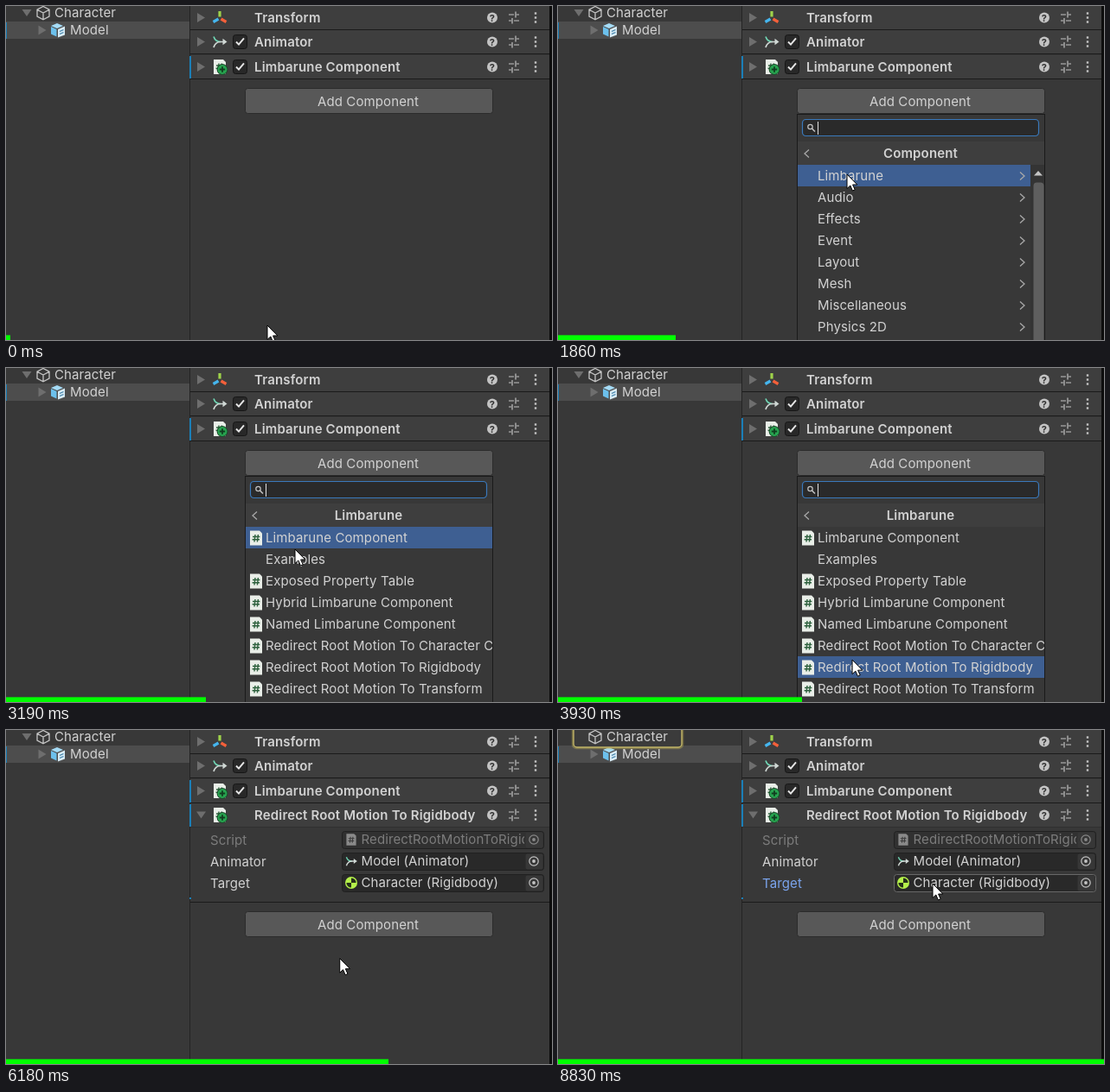
These frames come from a looping animation (631 px wide and 387 px high, 8.9 s). An HTML page with a canvas:

```html
<!DOCTYPE html>
<html lang="en">
<head>
<meta charset="utf-8">
<title>Adding a component</title>
<style>
  html, body { margin: 0; width: 100%; height: 100%; overflow: hidden; background: #383838; }
  canvas { display: block; }
</style>
</head>
<body>
<canvas id="stage" width="631" height="387"></canvas>
<script>
const W = 631, H = 387, LOOP = 8900, STEPS = 134, STEP = LOOP / STEPS;
const ctx = document.getElementById('stage').getContext('2d');
const TEXT = '#d2d2d2', PANEL = '#383838', HEADER = '#3e3e3e', LINE = '#1a1a1a', SELECT = '#3e5f92', BLUE = '#1b7fb8';
const PLUGIN = 'Limbarune';

const CATEGORIES = [PLUGIN, 'Audio', 'Effects', 'Event', 'Layout', 'Mesh', 'Miscellaneous', 'Physics 2D'];
const SCRIPTS = [`${PLUGIN} Component`, 'Examples', 'Exposed Property Table', `Hybrid ${PLUGIN} Component`,
  `Named ${PLUGIN} Component`, 'Redirect Root Motion To Character Controller',
  'Redirect Root Motion To Rigidbody', 'Redirect Root Motion To Transform'];

// Times in ms
const MENU_OPEN = 1150, SLIDE = 2080, SLIDE_TIME = 250, ADDED = 4715, PING = 7084, PING_TIME = 200;
const CLICKS = [[990, 1150], [1945, 2080], [4500, 4715], [7050, 7300]];
const PATH = [ // time, x, y
  [150, 302, 370], [830, 325, 108], [1150, 325, 110], [1700, 334, 195], [3060, 334, 196],
  [3190, 334, 210], [3730, 340, 328], [3860, 340, 338], [4400, 341, 343], [4700, 342, 345],
  [5680, 342, 345], [6700, 433, 178]];

const smooth = u => u * u * (3 - 2 * u);
const clamp01 = u => Math.min(1, Math.max(0, u));

function cursorAt(time) {
  const next = PATH.findIndex(p => p[0] > time);
  if (next === 0) return PATH[0].slice(1);
  if (next < 0) return PATH[PATH.length - 1].slice(1);
  const [t0, x0, y0] = PATH[next - 1], [t1, x1, y1] = PATH[next];
  const u = smooth((time - t0) / (t1 - t0));
  return [x0 + (x1 - x0) * u, y0 + (y1 - y0) * u];
}

function rect(x, y, w, h, color) {
  ctx.fillStyle = color;
  ctx.fillRect(x, y, w, h);
}

function box(x, y, w, h, r, fill, stroke, lineWidth = 1) {
  ctx.beginPath();
  ctx.roundRect(x + .5, y + .5, w - 1, h - 1, r);
  ctx.fillStyle = fill;
  ctx.fill();
  if (stroke) {
    ctx.strokeStyle = stroke;
    ctx.lineWidth = lineWidth;
    ctx.stroke();
  }
}

function disc(x, y, r, color) {
  ctx.beginPath();
  ctx.arc(x, y, r, 0, Math.PI * 2);
  ctx.fillStyle = color;
  ctx.fill();
}

function ring(x, y, r, color) {
  ctx.beginPath();
  ctx.arc(x, y, r, 0, Math.PI * 2);
  ctx.strokeStyle = color;
  ctx.lineWidth = 1.2;
  ctx.stroke();
}

function line(d, color, width = 1.5, x = 0, y = 0) {
  ctx.save();
  ctx.translate(x, y);
  ctx.strokeStyle = color;
  ctx.lineWidth = width;
  ctx.stroke(new Path2D(d));
  ctx.restore();
}

function shape(d, color, x = 0, y = 0) {
  ctx.save();
  ctx.translate(x, y);
  ctx.fillStyle = color;
  ctx.fill(new Path2D(d));
  ctx.restore();
}

function label(text, x, y, color = TEXT, weight = 400, align = 'left', size = 15) {
  ctx.font = `${weight} ${size}px Inter, sans-serif`;
  ctx.letterSpacing = weight === 400 ? '0.11px' : '0.16px';
  ctx.textAlign = align;
  ctx.fillStyle = color;
  ctx.fillText(text, x, y);
}

function clipped(x, y, w, h, draw) {
  ctx.save();
  ctx.beginPath();
  ctx.rect(x, y, w, h);
  ctx.clip();
  draw();
  ctx.restore();
}

function scaled(x, y, scale, draw) {
  ctx.save();
  ctx.translate(x, y);
  ctx.scale(scale, scale);
  draw();
  ctx.restore();
}

// Icons, placed by their centre
const arrowRight = (x, y) => shape('M-4.5-5.5 4.5 0-4.5 5.5Z', '#6e6e6e', x, y);
const arrowDown = (x, y) => shape('M-5.5-4H5.5L0 4Z', '#6e6e6e', x, y);
const chevron = (x, y, dir) => line(`M${-2.5 * dir}-4.5 ${2.5 * dir} 0 ${-2.5 * dir} 4.5`, '#a8a8a8', 1.3, x, y);

function cubeOutline(x, y) {
  line('M0-7.5 7-3.8V4L0 7.7-7 4V-3.8ZM-7-3.8 0 0 7-3.8M0 0V7.7', '#c6c6c6', 1.3, x, y);
}

function prefabCube(x, y) {
  shape('M-1-8 6-5-1-2-8-5Z', '#a5dcf7', x, y);
  shape('M-8-4-1.5-1V7.5L-8 4.5Z', '#6cc0ec', x, y);
  shape('M0-1 8-4.5V5.5L0 8.5Z', '#d8ecf6', x, y);
  line('M2 1.5 6.5-.5M2 4.5 6.5 2.5', '#3b7fa8', 1.3, x, y);
}

function scriptIcon(x, y, paper = '#e9eee8', ink = '#2b5f3b') {
  shape('M-7-8.5H4L7-5.5V8.5H-7Z', paper, x, y);
  line('M-1-4-2 4.5M2.4-4 1.4 4.5M-4-1.5H4.4M-4.4 1.8H4', ink, 1.4, x, y);
}

function addedScriptIcon(x, y) {
  scriptIcon(x, y);
  disc(x + 3, y + 3, 6.4, '#1d4a2c');
  disc(x + 3, y + 3, 5.4, '#27a34f');
  line('M-3.2 0H3.2M0-3.2V3.2', '#123d20', 1.8, x + 3, y + 3);
}

function transformIcon(x, y) {
  line('M0-1V-7.5', '#9fd34a', 3.2, x, y);
  line('M-1.5 1.5-7.5 5', '#45b5ee', 3.2, x, y);
  line('M1.5 1.5 7.5 5', '#f4603a', 3.2, x, y);
}

function animatorIcon(x, y) {
  line('M-7-6Q-5 0 1 0', '#6fd6b4', 1.7, x, y);
  line('M-7 6.5Q-5 0 1 0H6', '#d0d8d5', 1.7, x, y);
  shape('M3.5-3.8 8.5 0 3.5 3.8Z', '#d0d8d5', x, y);
}

function rigidbodyIcon(x, y) {
  disc(x, y, 7, '#b4f04a');
  shape('M0 0V-5.6A5.6 5.6 0 0 1 5.6 0ZM0 0V5.6A5.6 5.6 0 0 1-5.6 0Z', '#26301a', x, y);
}

function checkbox(x, y) {
  box(x - 8, y - 8, 17, 17, 3, '#282828', '#161616');
  line('M-4 .5-1 3.6 5-3.6', '#e6e6e6', 2, x, y);
}

function hierarchy() {
  rect(0, 18, 212, 20, '#4d4d4d');
  rect(0, 19, 1, 19, BLUE);
  arrowDown(24, 8);
  cubeOutline(43, 8);
  label('Character', 56, 13);
  arrowRight(42, 28);
  prefabCube(60, 28);
  label('Model', 74, 33);
}

function componentHeader(name, y, icon, { enabled, added, open } = {}) {
  const bottom = Math.floor(y + 13.5);
  rect(213, bottom - 27, 415, 27, HEADER);
  rect(213, bottom, 415, 1, open ? '#303030' : LINE);
  if (added) rect(212, bottom - 26, 2, 26, BLUE);
  (open ? arrowDown : arrowRight)(225.5, y);
  icon(247, y);
  if (enabled) checkbox(270, Math.floor(y));
  label(name, 287, Math.floor(y + 5.5), TEXT, 600);
  disc(562, y, 6, '#c4c4c4');
  label('?', 562, y + 4, '#333', 700, 'center', 11);
  line('M-6-3.5H0M3-3.5H6M2-7V0M-6 3.5H-3M0 3.5H6M-2 .5V7', '#c4c4c4', 1.2, 587, y);
  for (const dy of [-5, 0, 5]) rect(610.8, y + dy - 1.2, 2.4, 2.4, '#c4c4c4');
}

function objectField(name, value, y, icon, { disabled, focused } = {}) {
  const color = disabled ? '#7c7c7c' : TEXT, dot = disabled ? '#8a8a8a' : '#c4c4c4';
  label(name, 236, y + 6, focused ? '#7ba5ee' : color);
  box(388, y - 10, 234, 21, 3, disabled ? '#313131' : '#292929', focused ? '#686868' : '#202020');
  box(600, y - 9, 21, 19, 2, '#373737');
  icon(399, y);
  clipped(408, y - 10, 191, 21, () => label(value, 410.5, y + 5, color));
  ring(610, y, 5.2, dot);
  disc(610, y, 1.9, dot);
}

function addButton(y, hover) {
  box(276, y, 287, 30, 3, hover ? '#676767' : '#585858', '#2b2b2b');
  label('Add Component', 418.5, y + 21, TEXT, 400, 'center');
}

function inspector(time, [x, y]) {
  const added = time >= ADDED;
  componentHeader('Transform', 13.5, transformIcon);
  componentHeader('Animator', 41.5, animatorIcon, { enabled: true });
  componentHeader(`${PLUGIN} Component`, 70.5, addedScriptIcon, { enabled: true, added: true });
  if (added) {
    const focused = time >= PING - 30;
    componentHeader('Redirect Root Motion To Rigidbody', 98.5, addedScriptIcon, { added: true, open: true });
    objectField('Script', 'RedirectRootMotionToRigidbody', 127,
      (cx, cy) => scaled(cx, cy, .8, () => scriptIcon(0, 0, '#8a8a8a', '#3c3c3c')), { disabled: true });
    objectField('Animator', 'Model (Animator)', 152, (cx, cy) => scaled(cx, cy, .8, () => animatorIcon(0, 0)));
    objectField('Target', 'Character (Rigidbody)', 177, rigidbodyIcon, { focused });
    rect(212, 194, 2, 2, BLUE);
    rect(213, 199, 415, 1, LINE);
  }
  const top = added ? 210 : 95;
  const menuOpen = time >= MENU_OPEN && !added;
  addButton(top, !menuOpen && x > 277 && x < 562 && y > top && y < top + 29);
}

function menuPage(title, items, selected, isRoot) {
  rect(277, 157, 285, 27, HEADER);
  chevron(287.5, 171, -1);
  label(title, 419, 176, TEXT, 600, 'center');
  items.forEach((item, i) => {
    const top = 184 + 25 * i;
    if (i === selected) rect(277, top, isRoot ? 269 : 285, 25, SELECT);
    if (!isRoot && item !== 'Examples') scriptIcon(289, top + 13);
    label(item, 300, top + 18);
    if (isRoot) chevron(536.5, top + 13, 1);
  });
  if (isRoot) {
    rect(546, 184, 16, 203, '#343434');
    shape('M-5 2.5 0-3 5 2.5Z', '#c4c4c4', 555, 194);
    box(549, 204, 13, 200, 4, '#5f5f5f');
  }
}

function menu(time, cursorY) {
  rect(276, 125, 287, 262, LINE);
  rect(277, 126, 285, 261, PANEL);
  box(282, 131, 274, 20, 4, '#2a2a2a', '#3a79bb', 1.2);
  ring(291.5, 140, 2.7, '#c4c4c4');
  line('M293.5 142 297 145.5', '#c4c4c4', 1.5);
  rect(300, 134, 1, 15, '#e0e0e0');

  const hovered = Math.floor((cursorY - 186) / 25);
  const shift = 285 * smooth(clamp01((time - SLIDE) / SLIDE_TIME));
  clipped(277, 156, 285, 231, () => {
    ctx.translate(-shift, 0);
    if (shift < 285) menuPage('Component', CATEGORIES, hovered, true);
    ctx.translate(285, 0);
    if (shift > 0) menuPage(PLUGIN, SCRIPTS, hovered, false);
  });
}

function ping(time) {
  const half = PING_TIME / 2, age = time - PING;
  const scale = 1 + .75 * Math.max(0, 1 - Math.abs(age - half) / half);
  scaled(99.5, 8.5, scale, () => {
    ctx.translate(-99.5, -8.5);
    box(17, -4, 127, 25, 4, PANEL, 'rgba(190,175,80,.4)', 3.5);
    box(17.5, -3.5, 126, 24, 4, '#3b3b3b', '#c3b668', 1.4);
    cubeOutline(43, 8);
    label('Character', 56, 13);
  });
}

function pointer([x, y], pressed) {
  if (pressed) disc(x, y, 15, 'rgba(215,205,30,.75)');
  const arrow = 'M0 0V16.5L3.8 13 6.4 19 9.2 17.8 6.6 12H11.8Z';
  shape(arrow, '#fff', x, y);
  line(arrow, '#000', 1, x, y);
}

function render(step) {
  const time = step * STEP, cursor = cursorAt(time);
  rect(0, 0, W, H, PANEL);
  hierarchy();
  rect(212, 0, 1, H, '#242424');
  inspector(time, cursor);
  rect(628, 0, 3, H, '#0c0c0c');
  if (time >= MENU_OPEN && time < ADDED) menu(time, cursor[1]);
  if (time >= PING) ping(time);
  pointer(cursor, CLICKS.some(([down, up]) => time >= down && time < up));
  rect(0, 381.4, step === STEPS - 1 ? W : Math.round((step + 1) * 4.7045), 6, '#0f0');
}

const start = performance.now();
function tick() {
  const elapsed = (performance.now() - start) % LOOP;
  render(Math.min(STEPS - 1, Math.floor((elapsed + 8) / STEP)));
  requestAnimationFrame(tick);
}
tick();
</script>
</body>
</html>
```
